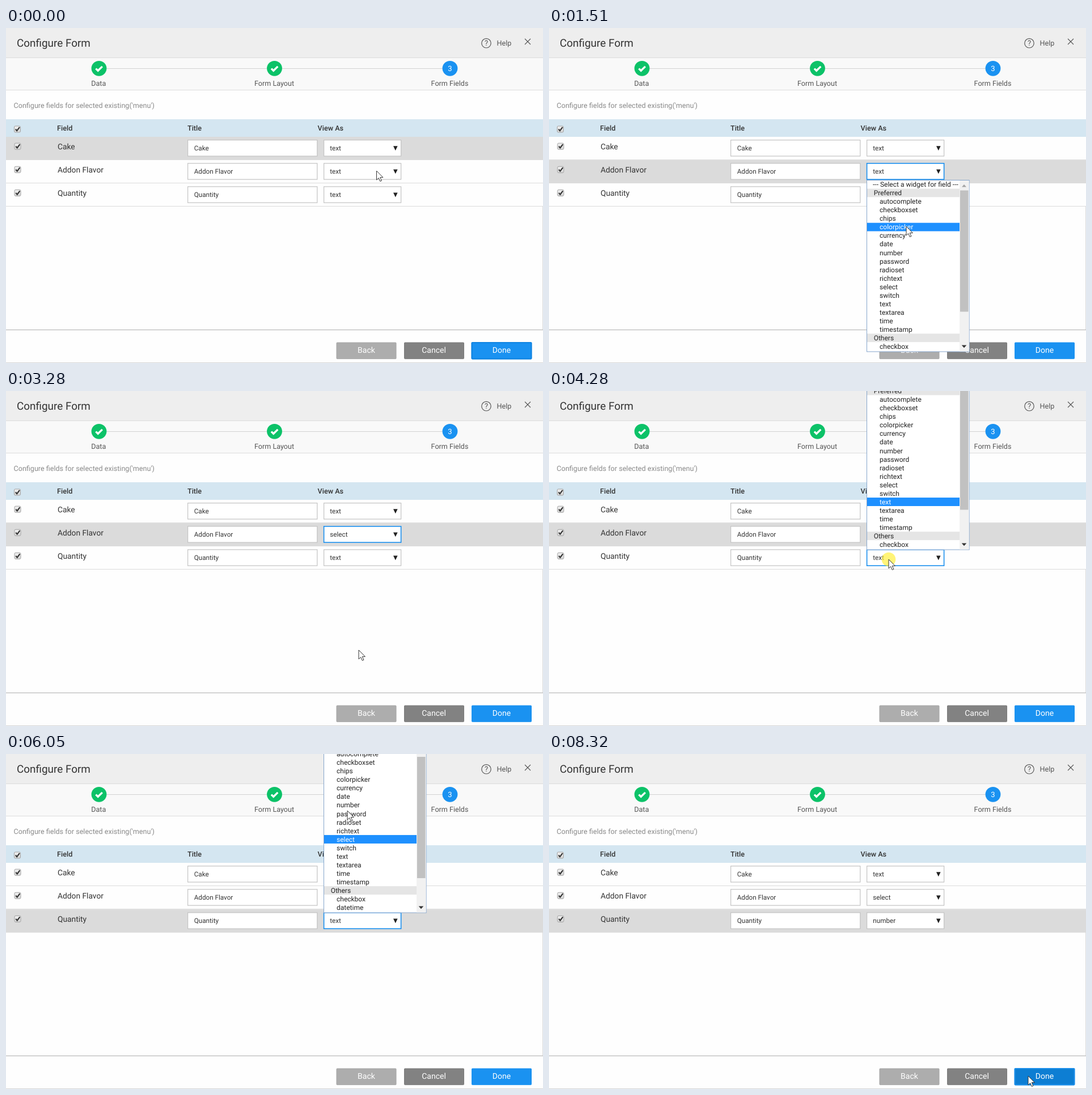
Recreate the animation shown at these times as an HTML page. Size 947 by 591 pixels, loop 8390 ms.

```html
<!DOCTYPE html>
<html lang="en">
<head>
<meta charset="utf-8">
<title>Configure Form</title>
<style>
  html, body { margin: 0; width: 100%; height: 100%; overflow: hidden; background: #fefefe; }
  svg { display: block; width: 947px; height: 591px; font: 12.6px Roboto, sans-serif; text-rendering: geometricPrecision; }
  text { fill: #333; white-space: pre; }
  .mid { text-anchor: middle; }
  .soft { fill: #555; }
  .head { font-weight: 500; }
  .name { font-size: 13.8px; }
  .value { font-size: 11.7px; }
  .button text { font-size: 14px; fill: #fff; text-anchor: middle; }
  .box { fill: #fff; stroke: #c3c3c3; stroke-width: 1.2; }
  .box.focus { stroke: #1a8fee; stroke-width: 1.6; }
  .row { fill: #fefefe; }
  .row.hover { fill: #dbdbdb; }
  .line { fill: none; stroke: #dcdcdc; }
  .done rect { fill: #1a92f1; stroke: #1a92f1; }
  .done.focus rect { stroke: #0f84e2; stroke-width: 2.2; }
  .done.hover rect { fill: #0d7ed3; }
  .done.hover.focus rect { stroke: #1b8ee9; }
  #items text { font-size: 12px; fill: #222; }
  #items .lit rect { fill: #1e90ff; }
  #items .lit text { fill: #fff; }
</style>
</head>
<body>
<svg viewBox="0 0 947 591">
  <defs>
    <linearGradient id="shade" x2="0" y2="1">
      <stop stop-color="#f2f2f2"/><stop offset="1" stop-color="#d6d6d6"/>
    </linearGradient>
    <clipPath id="view"><rect x="561" y="269" width="163" height="301"/></clipPath>
    <g id="check">
      <rect x="-5.5" y="-5.5" width="11" height="11" rx="2" fill="url(#shade)" stroke="#a2a2a2"/>
      <path d="M-3.2 0L-.8 2.8L4 -3.6" fill="none" stroke="#333" stroke-width="2.1"/>
    </g>
    <g id="tick">
      <circle r="13.4" fill="#0cc268"/>
      <path d="M-5.6 .3L-1.8 4L5.8 -3.4" fill="none" stroke="#fff" stroke-width="3.4"/>
    </g>
  </defs>

  <rect width="947" height="52" fill="#eee"/>
  <rect y="53" width="947" height="56" fill="#f9f9f9"/>
  <path class="line" d="M0 52.5H947M0 109.5H947"/>
  <text x="19" y="32.5" font-size="18.9">Configure Form</text>
  <circle cx="847" cy="26.8" r="8.2" fill="none" stroke="#555" stroke-width="1.2"/>
  <text class="mid soft" x="847" y="31.4" font-size="13">?</text>
  <text class="soft" x="865.5" y="30.5">Help</text>
  <path d="M915 19L925 29M925 19L915 29" stroke="#555" stroke-width="1.1"/>

  <path d="M164 71.5H783" stroke="#d2d2d2"/>
  <use href="#tick" x="164" y="71.3"/>
  <use href="#tick" x="473.5" y="71.3"/>
  <circle cx="783" cy="71.3" r="13.4" fill="#1a92f1"/>
  <text class="mid" x="783" y="76" font-size="13" style="fill:#fff">3</text>
  <text class="mid soft" x="163.2" y="102">Data</text>
  <text class="mid soft" x="473" y="102">Form Layout</text>
  <text class="mid soft" x="782.5" y="102">Form Fields</text>
  <text x="13.5" y="140.5" style="fill:#8a8a8a">Configure fields for selected existing('menu')</text>

  <rect y="161" width="947" height="31" fill="#d4e6f1"/>
  <use href="#check" x="20" y="178.5"/>
  <text class="head" x="90" y="181">Field</text>
  <text class="head" x="320" y="181">Title</text>
  <text class="head" x="549.5" y="181">View As</text>
  <g id="rows"></g>
  <path class="line" d="M946.5 315V532"/>
  <path d="M0 532.5H947" stroke="#c2c2c2" stroke-width="1.4"/>
  <path d="M0 590.5H947" stroke="#d4d4d4"/>

  <g class="button">
    <rect x="583" y="555" width="105" height="28.6" rx="1" fill="#adadad" stroke="#a6a6a6"/>
    <text x="635.5" y="573">Back</text>
    <rect x="702.5" y="555" width="105" height="28.6" rx="1" fill="#828282" stroke="#7a7a7a"/>
    <text x="754.5" y="573">Cancel</text>
  </g>
  <g class="button done" id="done">
    <rect x="821.5" y="555" width="105" height="28.6" rx="1"/>
    <text x="874" y="573">Done</text>
  </g>

  <g id="menu">
    <rect x="560.5" y="268.5" width="180.6" height="302.5" fill="#fff" stroke="#85a5cc"/>
    <g clip-path="url(#view)"><g id="items"></g></g>
    <rect x="724" y="269" width="16.5" height="301.5" fill="#f1f1f1"/>
    <path d="M728 280.5H736L732 276Z" fill="#a3a3a3"/>
    <rect id="thumb" x="725" y="286.5" width="14.5" height="214" fill="#c1c1c1"/>
    <path d="M727.7 559.5H736.3L732 564.2Z" fill="#333"/>
  </g>

  <g id="cursor">
    <circle id="glow" r="12.3" fill="#ffee30" opacity=".65"/>
    <path d="M0 0V16L3.7 12.6L6.3 18.5L8.9 17.4L6.3 11.6H11.4Z" fill="#fff" stroke="#333"/>
  </g>
</svg>
<script>
const LOOP = 8390;
const PITCH = 15.04, FIRST = 276;   // menu line height, centre of the first line
const TEXT = 14;                    // menu index of "text"
const options = ('--- Select a widget for field ---,Preferred,autocomplete,checkboxset,chips,colorpicker,' +
  'currency,date,number,password,radioset,richtext,select,switch,text,textarea,time,timestamp,' +
  'Others,checkbox,datetime').split(',');
const $ = id => document.getElementById(id);

$('rows').innerHTML = ['Cake', 'Addon Flavor', 'Quantity'].map((name, i) => {
  const y = 192 + i * 41.1;
  return `<rect class="row" y="${y}" width="947" height="41"/>
    <path class="line" d="M0 ${Math.round(y + 40) + .5}H947"/>
    <use href="#check" x="20.5" y="${y + 16.7}"/>
    <text class="name" x="91" y="${y + 22}">${name}</text>
    <rect class="box" x="320.6" y="${y + 5.7}" width="228.2" height="28.3"/>
    <text class="value" x="331.7" y="${y + 24.2}">${name}</text>
    <rect class="box view" x="560.6" y="${y + 5.7}" width="136" height="28.3"/>
    <text class="value kind" x="571.3" y="${y + 24.2}">text</text>
    <path d="M683 ${y + 16.3}H690.6L686.8 ${y + 24.2}Z" fill="#222"/>`;
}).join('');

const isGroup = i => i === 1 || i === 18;
$('items').innerHTML = options.map((label, i) => {
  const y = FIRST + i * PITCH, x = i === 0 ? 571 : isGroup(i) ? 572.7 : 583;
  return `<g><rect x="561" y="${y - 7.5}" width="163" height="15" fill="${isGroup(i) ? '#e5e5e5' : '#fff'}"/>
    <text x="${x}" y="${y + 4.2}">${label}</text></g>`;
}).join('');

const rows = document.querySelectorAll('.row');
const views = document.querySelectorAll('.view');
const kinds = document.querySelectorAll('.kind');
const items = [...$('items').children];

const linear = p => p;
const easeIn = p => p ** 1.5;
const easeOut = p => 1 - (1 - p) ** 1.5;
const smooth = p => p * p * (3 - 2 * p);

// first step, last step, number of steps, end x, end y, easing
const moves = [
  [70, 240, 3, 643.5, 248.5, easeOut],
  [1120, 1510, 6, 630, 350, easeIn],
  [1590, 1820, 4, 622, 396, easeOut],
  [2270, 2730, 7, 622, 457, smooth],
  [3510, 3820, 5, 598, 287, smooth],
  [3890, 3970, 2, 599, 297, linear],
  [4970, 5300, 5, 607, 214, linear],
  [5370, 5760, 6, 604, 153, easeOut],
  [5990, 6050, 2, 602, 100, linear],
  [6220, 6570, 5, 601, 90, easeOut],
  [7310, 7840, 8, 845, 571, smooth],
  [8010, 8010, 1, 845, 568, linear]
];
const clicks = [[390, 630], [2960, 3280], [4120, 4350], [6780, 7010], [8010, 8320]];
const menus = [
  { from: 550, to: 3190, shift: 0, lag: 0, moved: 1120 },
  { from: 4280, to: 7010, shift: -291, lag: 75, moved: 4970, scrollAt: 5217 }
];
const within = (t, from, to) => t >= from && t < to;

function cursorAt(t) {
  let x = 653.5, y = 252;
  for (const [from, to, n, endX, endY, ease] of moves) {
    if (t < from) break;
    const k = n === 1 ? 1 : Math.min(n, 1 + Math.floor((t - from) / (to - from) * (n - 1) + .001));
    const p = ease(k / n);
    x += (endX - x) * p;
    y += (endY - y) * p;
  }
  return { x, y };
}

function litItem(menu, t, scroll) {
  const y = cursorAt(t - menu.lag).y - menu.shift;
  if (t < menu.moved || y < 269 || y > 570) return TEXT;
  const i = Math.round((y - FIRST) / PITCH) + scroll;
  return isGroup(i) ? i + 1 : i;
}

function drawMenu(t) {
  const menu = menus.find(m => within(t, m.from, m.to));
  $('menu').style.display = menu ? '' : 'none';
  if (!menu) return;
  const scroll = t >= menu.scrollAt ? 1 : 0;
  const lit = litItem(menu, t, scroll);
  $('menu').setAttribute('transform', `translate(0 ${menu.shift})`);
  $('items').setAttribute('transform', `translate(0 ${-scroll * PITCH})`);
  $('thumb').setAttribute('y', 286.5 + scroll * 9.5);
  items.forEach((item, i) => item.classList.toggle('lit', i === lit));
}

function draw(t) {
  const { x, y } = cursorAt(t);
  const hovered = t < 630 ? 0 : t < 4350 ? 1 : 2;
  const focused = within(t, 470, 4200) ? 1 : within(t, 4200, 8090) ? 2 : -1;
  rows.forEach((row, i) => row.classList.toggle('hover', i === hovered));
  views.forEach((view, i) => view.classList.toggle('focus', i === focused));
  kinds[1].textContent = t < 3190 ? 'text' : 'select';
  kinds[2].textContent = t < 7010 ? 'text' : 'number';
  $('done').classList.toggle('focus', focused < 0);
  $('done').classList.toggle('hover', x > 821 && y > 554);
  drawMenu(t);
  $('cursor').setAttribute('transform', `translate(${x} ${y})`);
  $('glow').style.display = clicks.some(c => within(t, ...c)) ? '' : 'none';
}

const start = performance.now();
function tick() {
  draw((performance.now() - start) % LOOP);
  requestAnimationFrame(tick);
}
draw(0);
requestAnimationFrame(tick);
</script>
</body>
</html>
```
